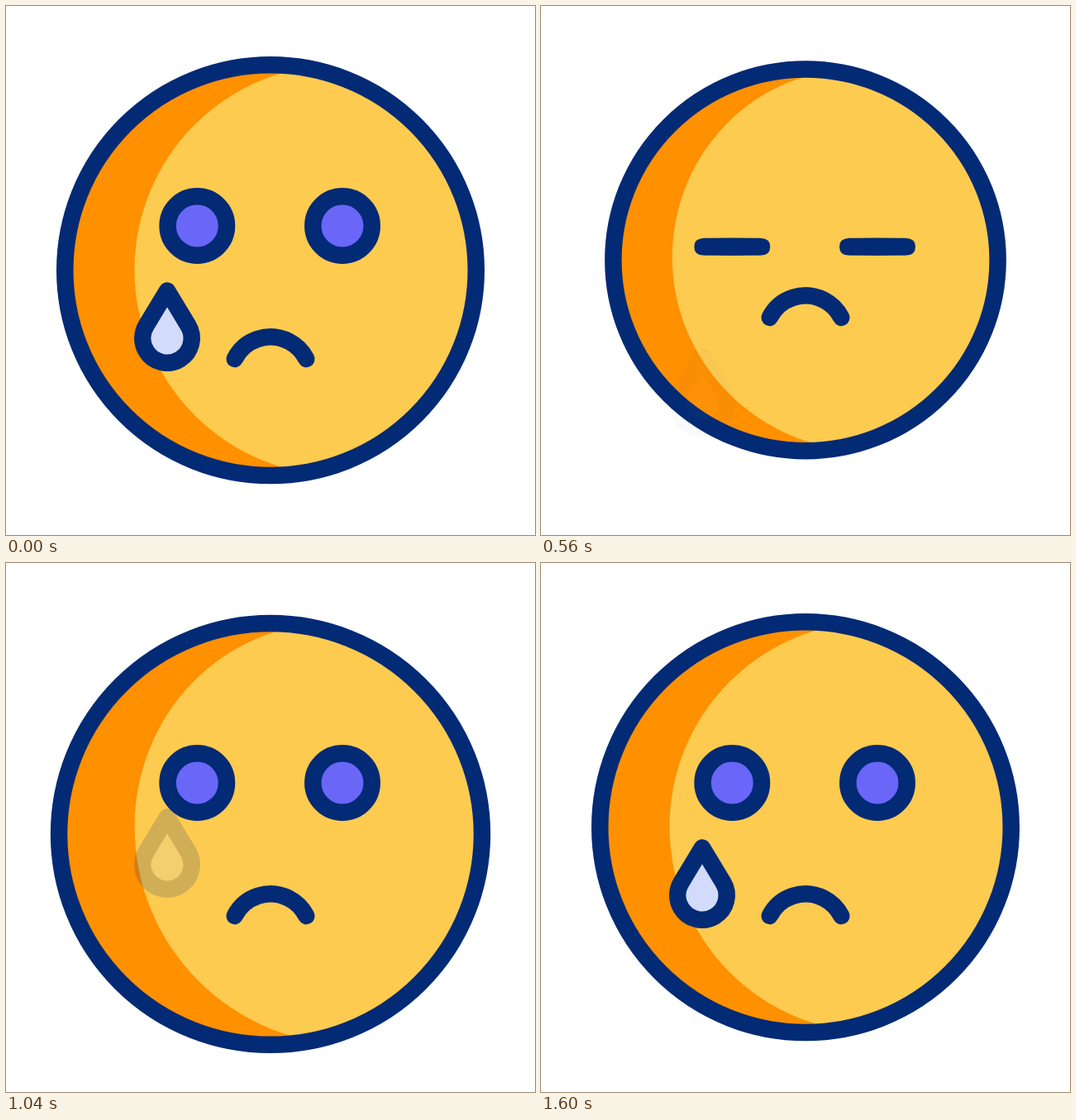
Write an HTML page with a canvas that moves like this. It is 640 px wide and 640 px high and loops after 2000 ms.

```html
<!DOCTYPE html>
<html lang="en">
<head>
<meta charset="utf-8">
<title>Crying face</title>
<style>
html, body { margin: 0; width: 100%; height: 100%; overflow: hidden; background: #fff; }
canvas { display: block; width: 640px; height: 640px; }
</style>
</head>
<body>
<canvas id="stage" width="640" height="640"></canvas>
<script>
const LOOP = 2000, STEP = 40, LINE = 20.5;
const NAVY = '#032a75', YELLOW = '#fdcb50', ORANGE = '#ff9000', VIOLET = '#6a66f8', WATER = '#d2dbfa';
const ctx = document.getElementById('stage').getContext('2d');

const clamp = v => Math.min(1, Math.max(0, v));
const progress = (t, from, to) => clamp((t - from) / (to - from));
const lerp = (a, b, u) => a + (b - a) * u;
const easeOut = u => 1 - (1 - u) ** 2;
const soften = u => 0.6 * u * u * (3 - 2 * u) + 0.4 * u;

// Rest, raised, dropped, rest: values at the four key times.
function pose(t, times, values, lastEase = u => u) {
  const i = t < times[1] ? 0 : t < times[2] ? 1 : 2;
  const u = progress(t, times[i], times[i + 1]);
  const stops = [...values, values[0]];
  return lerp(stops[i], stops[i + 1], i === 2 ? lastEase(u) : u);
}

function setLine(c) {
  c.lineWidth = LINE;
  c.lineCap = c.lineJoin = 'round';
  c.strokeStyle = NAVY;
}

// The tear is painted once on its own layer so that it fades as a whole.
const tearLayer = document.createElement('canvas');
tearLayer.width = 100;
tearLayer.height = 130;
{
  const c = tearLayer.getContext('2d');
  const x = 50, apex = 20.5, y = 78, r = 29.7;
  const tilt = Math.asin(r / (y - apex));
  setLine(c);
  c.beginPath();
  c.moveTo(x, apex);
  c.arc(x, y, r, -tilt, Math.PI + tilt);
  c.closePath();
  c.fillStyle = WATER;
  c.fill();
  c.stroke();
}

function drawFace(t) {
  const key = (...values) => pose(t, [0, 421, 862, 1260], values);
  const rx = key(259, 229.5, 272) - LINE / 2;
  const top = key(61, 67.2, 64.3) + LINE / 2;
  const bottom = key(578.3, 522.5, 605) - LINE / 2;
  const left = key(155.5, 160.3, 155.7);
  const mid = key(319, 297, 319);
  const upper = key(248, 219, 230);
  const lower = key(248, 218, 276);

  const outline = () => {
    ctx.beginPath();
    ctx.ellipse(320, (top + bottom) / 2, rx, (bottom - top) / 2, 0, 0, Math.PI * 2);
  };
  ctx.save();
  outline();
  ctx.clip();
  ctx.fillStyle = ORANGE;
  ctx.fillRect(0, 0, 640, 640);
  ctx.beginPath();
  ctx.ellipse(left + lower, mid, lower, bottom - mid, 0, Math.PI / 2, Math.PI);
  ctx.ellipse(left + upper, mid, upper, mid - top, 0, Math.PI, Math.PI * 1.5);
  ctx.lineTo(640, top);
  ctx.lineTo(640, bottom);
  ctx.closePath();
  ctx.fillStyle = YELLOW;
  ctx.fill();
  ctx.restore();
  outline();
  ctx.stroke();
}

function drawFeatures(t) {
  const times = [0, 380, 803, 1010];
  const eyeY = 266 + pose(t, times, [0, -62, 143], easeOut);
  const mouthY = 449 + pose(t, times, [0, -137.5, 68], easeOut);
  const open = t < 500 ? 1 - progress(t, 0, 231) : progress(t, 770, 914);

  ctx.fillStyle = VIOLET;
  for (const x of [231.3, 407]) {
    ctx.beginPath();
    ctx.ellipse(x, eyeY, 35.7, Math.max(0.4, 35.7 * open), 0, 0, Math.PI * 2);
    ctx.fill();
    ctx.stroke();
  }

  const spread = 1.1;
  ctx.beginPath();
  ctx.arc(320, mouthY, 48.6, -Math.PI / 2 - spread, -Math.PI / 2 + spread);
  ctx.stroke();
}

function drawTear(t) {
  const falling = t < 700;
  const u = soften(falling ? progress(t, 0, 590) : progress(t, 870, 1600));
  const y = 324 + (falling ? 81 * u : -45 * (1 - u));
  ctx.globalAlpha = falling ? 1 - u : u;
  ctx.drawImage(tearLayer, 145, y);
  ctx.globalAlpha = 1;
}

function frame(now) {
  const t = Math.floor((now % LOOP) / STEP) * STEP;
  ctx.fillStyle = '#fff';
  ctx.fillRect(0, 0, 640, 640);
  setLine(ctx);
  drawFace(t);
  drawFeatures(t);
  drawTear(t);
}

let start;
function tick(now) {
  start ??= now;
  frame(Math.max(0, now - start));
  requestAnimationFrame(tick);
}
frame(0);
requestAnimationFrame(tick);
</script>
</body>
</html>
```
